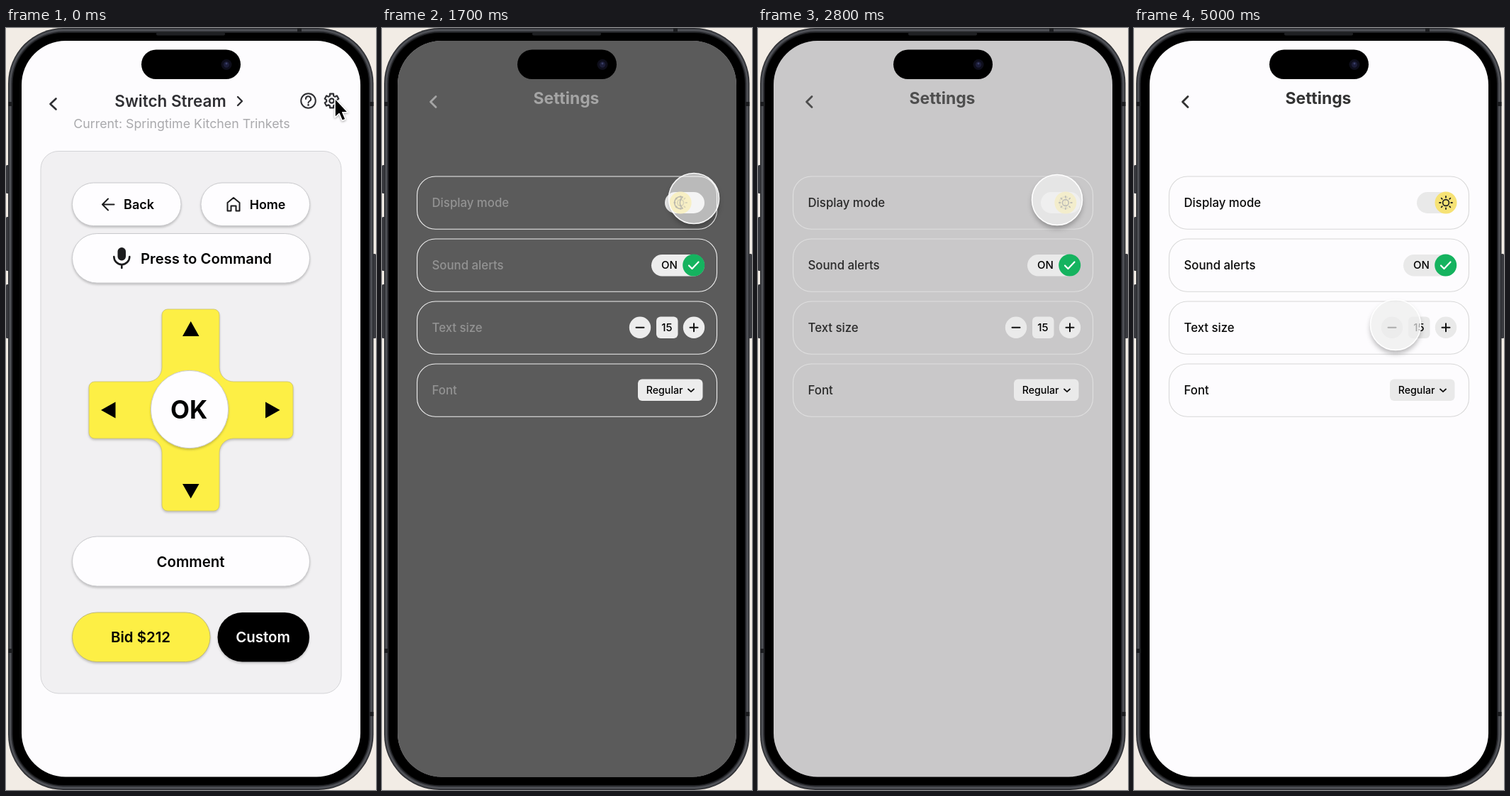
An HTML page for the animation above (5.6 s loop, 522 by 1073 pixels).

```html
<!DOCTYPE html>
<html lang="en">
<head>
<meta charset="utf-8">
<title>Remote settings</title>
<style>
  html, body { margin: 0; width: 100%; height: 100%; overflow: hidden; background: #f2ece5; }
  svg { display: block; width: 522px; height: 1073px; }
  text { font-family: Inter, "Liberation Sans", sans-serif; font-optical-sizing: none; }
  .line { fill: none; stroke-linecap: round; stroke-linejoin: round; }
  .lift { filter: drop-shadow(0 2px 1.5px rgba(0, 0, 0, .2)); }
  .row { fill: none; stroke: var(--edge); stroke-width: 1.1; }
  .label { fill: var(--ink); }
  .pad { fill: var(--pad); }
</style>
</head>
<body>
<svg id="stage" viewBox="0 0 522 1073" xmlns="http://www.w3.org/2000/svg"></svg>
<script>
const LOOP = 5600, STEP = 100;
const YELLOW = '#fdef45', DARK = '#2f2f33', PAPER = '#fdfcfe';

// ---- markup helpers ----
const box = (x, y, w, h, r, attrs = '') =>
  `<rect x="${x}" y="${y}" width="${w}" height="${h}" rx="${r}" ${attrs}/>`;
const dot = (x, y, r, attrs = '') => `<circle cx="${x}" cy="${y}" r="${r}" ${attrs}/>`;
const line = (d, color, width = 2, attrs = '') =>
  `<path class="line" d="${d}" stroke="${color}" stroke-width="${width}" ${attrs}/>`;
const shape = (d, fill, attrs = '') => `<path d="${d}" fill="${fill}" ${attrs}/>`;
const text = (str, x, mid, size, weight, attrs = '', anchor = 'middle') =>
  `<text x="${x}" y="${mid + size * .364}" font-size="${size}" font-weight="${weight}" text-anchor="${anchor}" ${attrs}>${str}</text>`;
const polar = (cx, cy, r, deg) => {
  const a = deg * Math.PI / 180;
  return `${(cx + r * Math.cos(a)).toFixed(2)} ${(cy + r * Math.sin(a)).toFixed(2)}`;
};

function phone() {
  const shells = [
    [3, 0, '#2a2b2f'], [4.2, 1.2, '#44464b'], [5.5, 2.5, '#53555b'],
    [7, 4, '#393a3f'], [8.3, 5.5, '#1b1c1f'], [9.6, 7, '#000']
  ];
  return [[0, 193, 40], [0, 266, 76], [0, 361, 76], [517, 318, 119]]
      .map(([x, y, h]) => box(x, y, 5, h, 1.5, 'fill="#38393e"')).join('') +
    shells.map(([x, y, c]) => box(x, y, 521.5 - 2 * x, 1073 - 2 * y, 81 - x, `fill="${c}"`)).join('') +
    [[3, 104], [3, 874], [512, 104], [512, 963]]
      .map(([x, y]) => box(x, y, 6.5, 6, 0, 'fill="#1d1e21"')).join('') +
    box(411, .5, 6, 6, 0, 'fill="#1d1e21"') +
    box(212, 6, 97, 4.5, 2, 'fill="#1f2023"');
}

function gear(cx, cy) {
  const pts = [];
  for (let i = 0; i < 6; i++)
    for (const [da, r] of [[-21, 7.4], [-14, 10.2], [14, 10.2], [21, 7.4]])
      pts.push(polar(cx, cy, r, i * 60 - 90 + da));
  return line('M' + pts.join('L') + 'Z', DARK, 2.2) +
    dot(cx, cy, 3.2, `fill="none" stroke="${DARK}" stroke-width="2.2"`);
}

function home() {
  const rim = 'fill="#fefdff" stroke="#c9c9cc" stroke-width="1" class="lift"';
  const cross = 'M228 396H293a8 8 0 0 1 8 8V478a20 20 0 0 0 20 20H397a8 8 0 0 1 8 8V570a8 8 0 0 1 -8 8' +
    'H321a20 20 0 0 0 -20 20V672a8 8 0 0 1 -8 8H228a8 8 0 0 1 -8 -8V598a20 20 0 0 0 -20 -20' +
    'H125a8 8 0 0 1 -8 -8V506a8 8 0 0 1 8 -8H200a20 20 0 0 0 20 -20V404a8 8 0 0 1 8 -8Z';
  return box(0, 0, 522, 1073, 0, `fill="${PAPER}"`) +
    line('M70.5 99.5L62.5 107L70.5 114.5', DARK, 2.6) +
    text('Switch Stream', 232, 102.5, 22.5, 600, `fill="${DARK}"`) +
    line('M327 97L333 103L327 109', DARK, 2.4) +
    dot(426.5, 102.5, 10.3, `fill="none" stroke="${DARK}" stroke-width="2"`) +
    line('M422.9 100a3.6 3.6 0 1 1 5.4 3c-1.3 .8 -1.8 1.4 -1.8 2.6', DARK, 2) +
    dot(426.5, 108.4, 1.3, `fill="${DARK}"`) +
    gear(459.5, 102.5) +
    text('Current: Springtime Kitchen Trinkets', 248, 135, 17.8, 400, 'fill="#a9a9ac"') +
    box(49, 173.5, 424, 763.5, 25, 'fill="#f1f0f2" stroke="#d3d3d6"') +
    box(93.5, 218, 153.5, 60.5, 30, rim) + box(275, 218, 153.5, 60.5, 30, rim) +
    box(93.5, 289.5, 335, 69.5, 34.7, rim) + box(93.5, 716, 335, 70, 35, rim) +
    line('M152.5 248.5H136M144 240.5L136 248.5L144 256.5', '#1c1c1e', 2) +
    text('Back', 187.5, 248.5, 18, 600) +
    line('M312.5 246L321 239L329.5 246V257.5H324.5V250.5H317.5V257.5H312.5Z', '#1c1c1e', 2) +
    text('Home', 369, 248.5, 17.8, 600) +
    box(157.5, 309, 11.5, 18.5, 5.7, 'fill="#1c1c1e"') +
    line('M152.3 322a11 11 0 0 0 22 0M163.3 333.5V338', '#1c1c1e', 2.6) +
    text('Press to Command', 282.5, 324.5, 20.3, 600) +
    shape(cross, YELLOW, 'class="lift" stroke="#c9c070" stroke-width=".8"') +
    shape('M249 434H272.5L260.7 413ZM249 642H272.5L260.7 662.5ZM134 538L154.5 526.5V549.5ZM386.5 538L366 526.5V549.5Z', '#000') +
    dot(259, 537, 54.7, rim) + text('OK', 258, 537.5, 35, 700) +
    text('Comment', 260.5, 751.5, 20.4, 600) +
    box(93.5, 823, 194.5, 69.5, 34.7, `fill="${YELLOW}" stroke="#bdb775" class="lift"`) +
    text('Bid $212', 190, 858, 20.4, 600) +
    box(298.5, 823, 129.5, 69.5, 34.7, 'fill="#000" class="lift"') +
    text('Custom', 362.5, 858, 20.4, 600, 'fill="#fff"');
}

function sun() {
  let rays = '';
  for (let a = 0; a < 360; a += 45)
    rays += `M${polar(0, 0, 7.3, a)}L${polar(0, 0, 9, a)}`;
  return `<g id="sun">${dot(0, 0, 4.4, 'fill="none" stroke="#222" stroke-width="1.7"')}${line(rays, '#222', 1.8)}</g>`;
}

const ROWS = ['Display mode', 'Sound alerts', 'Text size', 'Font'];

function settings() {
  return box(0, 0, 522, 1073, 0, `fill="${PAPER}"`) +
    box(0, 0, 522, 1073, 0, 'id="dim"') +
    line('M76 96.5L68.5 104L76 111.5', 'var(--head)', 2.8) +
    text('Settings', 260, 99, 22.9, 700, 'style="fill:var(--head)"') +
    ROWS.map((s, i) => box(49.5, 209 + 88 * i, 423, 74.3, 26, 'class="row"') +
      text(s, 70.5, 246 + 88 * i, 16.8, 500, 'class="label"', 'start')).join('') +
    box(399, 231, 56, 30, 15, 'class="pad"') +
    `<g id="knob">${dot(0, 0, 15.5, 'fill="#f6e275"')}${sun()}` +
    `<g id="moon">${line('M3 -8A8.5 8.5 0 1 0 3 8A10.5 10.5 0 0 1 3 -8Z', '#222', 1.8)}</g></g>` +
    box(380, 319, 75, 30.5, 15.2, 'class="pad"') + text('ON', 405.5, 334, 15, 500, 'id="on"') +
    dot(439.7, 334, 15.5, 'fill="#15b35f"') + line('M433 334.5L437.5 339L446.5 329.5', '#fff', 2.2) +
    dot(364, 421.7, 15.2, 'class="pad"') + line('M358.5 421.7H369.5', '#111', 2) +
    box(387, 406.5, 30.5, 30.5, 6, 'class="pad"') + text('15', 402, 421.7, 15, 500, 'id="num"') +
    dot(440, 421.7, 15.2, 'class="pad"') + line('M434.5 421.7H445.5M440 416.2V427.2', '#111', 2) +
    box(361, 494.5, 91.5, 30.5, 6, 'class="pad"') +
    text('Regular', 424.5, 509.7, 14.2, 500, 'id="weight"', 'end') +
    line('M432 508.5L436 512.2L440 508.5', '#111', 1.8);
}

const stage = document.getElementById('stage');
stage.innerHTML =
  `<defs><clipPath id="glass">${box(22, 18, 478, 1036.5, 62)}</clipPath>` +
  // everything around the touch disc, so its shadow never shows through it
  `<clipPath id="around"><path clip-rule="evenodd" d="M-60 -60H60V60H-60ZM-35.5 0a35.5 35.5 0 1 0 71 0a35.5 35.5 0 1 0 -71 0Z"/></clipPath></defs>` +
  phone() +
  `<g clip-path="url(#glass)"><g id="home">${home()}</g><g id="settings">${settings()}</g></g>` +
  box(191, 30.5, 140, 41.5, 20.7, 'fill="#000"') +
  dot(311, 51.5, 7.5, 'fill="#0e0e1b"') + dot(311, 51.5, 4.2, 'fill="#1c1d38"') + dot(311, 50, 1.5, 'fill="#3a3f66"') +
  `<g id="touch"><g clip-path="url(#around)">${dot(0, 5, 35.5, 'fill-opacity=".28" style="filter:blur(3.5px)"')}</g>` +
  `${dot(0, 0, 35.5, 'id="disc" stroke="#fff" stroke-width="1.6"')}</g>` +
  `<g id="arrow" style="filter:drop-shadow(0 1.5px 1.5px rgba(0,0,0,.35))">` +
  shape('M464 99V126L470 120.5L474.3 130.5L479 128.5L474.8 118.7H482.5Z', '#000', 'stroke="#fff" stroke-width="1.6" stroke-linejoin="round"') + '</g>';

const $ = id => document.getElementById(id);
const labels = [...stage.querySelectorAll('.label')];

// ---- motion ----
const clamp = p => Math.max(0, Math.min(1, p));
const mix = (a, b, p) => a + (b - a) * p;
const fade = (t, start, len = 300) => 1 - (1 - clamp((t - start) / len)) ** 2;
const gray = (a, b, p) => { const v = Math.round(mix(a, b, p)); return `rgb(${v},${v},${v})`; };

// time, x, y of the touch disc
const PATH = [
  [0, 464, 110], [600, 464, 110], [1200, 451, 238], [1600, 440, 240], [1800, 440, 240],
  [2200, 422, 242], [3000, 422, 242], [3600, 439, 422], [3900, 439, 422],
  [4100, 386, 422], [4300, 364, 421], [4700, 364, 421], [5000, 369, 418]
];

function touchAt(t) {
  const i = PATH.findIndex(p => p[0] >= t);
  if (i < 0) return PATH[PATH.length - 1].slice(1);
  if (i === 0) return PATH[0].slice(1);
  const a = PATH[i - 1], b = PATH[i], p = (t - a[0]) / (b[0] - a[0]), e = p * p * (3 - 2 * p);
  return [mix(a[1], b[1], e), mix(a[2], b[2], e)];
}

function sizeText(el, size, mid) {
  el.setAttribute('font-size', size);
  el.setAttribute('y', mid + size * .364);
}

function draw(t) {
  const open = fade(t, 130);
  const night = fade(t, 1580) - fade(t, 2637);
  const ink = night ** 1.3;
  const big = fade(t, 3720) - fade(t, 4350);

  $('home').style.display = open < 1 ? '' : 'none';
  $('settings').setAttribute('opacity', open);
  $('dim').setAttribute('opacity', night);
  const vars = { ink: gray(10, 255, ink), head: gray(51, 255, ink), edge: gray(216, 255, night), pad: gray(233, 240, night) };
  for (const k in vars) stage.style.setProperty('--' + k, vars[k]);

  $('knob').setAttribute('transform', `translate(${mix(440, 410.5, night)} 246)`);
  $('sun').setAttribute('opacity', 1 - night);
  $('moon').setAttribute('opacity', night);

  const nudge = [0, -.6, 1, .4];
  labels.forEach((el, i) => sizeText(el, mix(16.8, 19, big), 246 + 88 * i + nudge[i] * big));
  sizeText($('on'), mix(15, 16.6, big), 334);
  $('on').setAttribute('x', mix(405.5, 403, big));
  sizeText($('num'), mix(15, 16.4, big), 421.7);
  $('num').textContent = big > .5 ? '16' : '15';
  sizeText($('weight'), mix(14.2, 16.1, big), 509.7);

  const [x, y] = touchAt(t), deep = night ** 3;
  $('touch').setAttribute('transform', `translate(${x} ${y})`);
  $('disc').setAttribute('fill', gray(238, 255, night));
  $('disc').setAttribute('fill-opacity', .7 - .37 * deep);
  $('disc').setAttribute('stroke-opacity', 1 - .25 * deep);
  const arrow = t < 200;
  $('arrow').style.display = arrow ? '' : 'none';
  $('touch').style.display = arrow ? 'none' : '';
}

const begin = performance.now();
function tick() {
  const t = (performance.now() - begin) % LOOP;
  draw(Math.floor(t / STEP) * STEP);
  requestAnimationFrame(tick);
}
tick();
</script>
</body>
</html>
```
